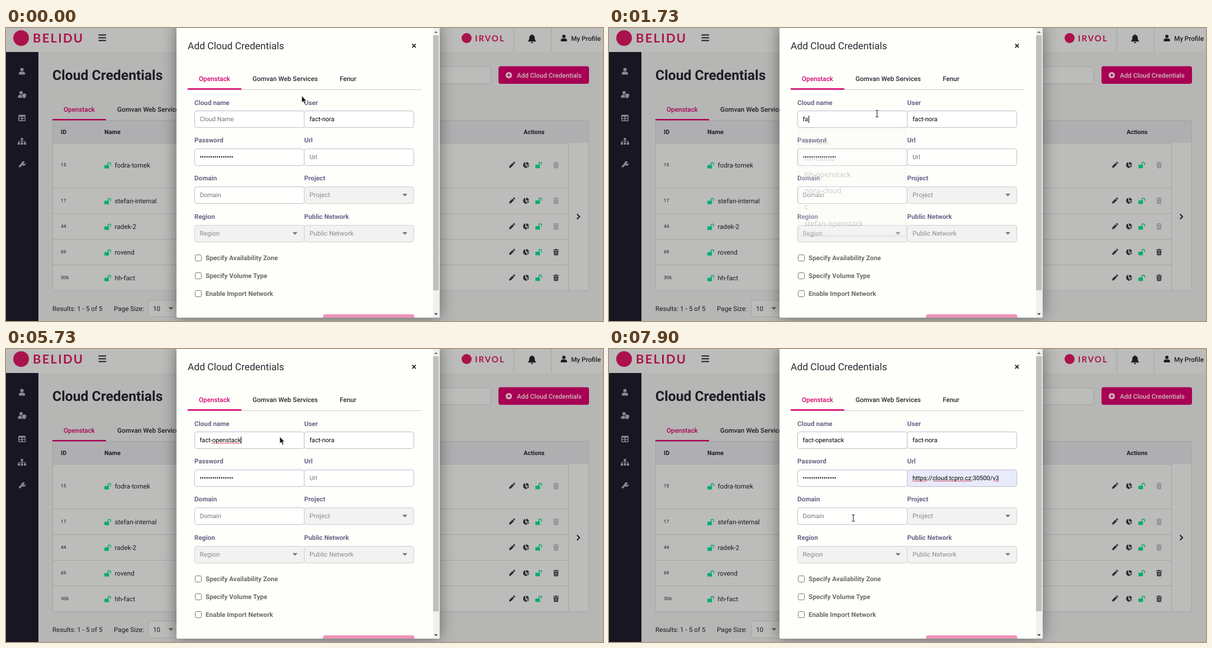
Recreate the animation shown at these times as an HTML page. Size 1068 by 525 pixels, loop 8000 ms.

```html
<!DOCTYPE html>
<html lang="en">
<head>
<meta charset="utf-8">
<title>Add Cloud Credentials</title>
<style>
html, body { margin: 0; width: 100%; height: 100%; overflow: hidden; background: #b6b6b5; }
svg { display: block; width: 1068px; height: 525px; }
text { font-family: Roboto, sans-serif; text-rendering: geometricPrecision; white-space: pre; }
.menu text { font-family: "Open Sans", sans-serif; }
.preview { font-family: "Liberation Sans", sans-serif; }
.brand { font-family: Lato, sans-serif; }
</style>
</head>
<body>
<svg id="stage" viewBox="0 0 1068 525"></svg>
<script>
const LOOP = 8000;
const CLOUD = 'fact-openstack';
const URL_TEXT = 'https://cloud.tcpro.cz:30500/v3';
const PINK = '#d6006c', INK = '#1d1c24', GREEN = '#05ac72';
// Colours of the page under the dark overlay
const DIM = { pink: '#a80054', logo: '#ab124c', panel: '#bcbcba', page: '#b6b6b5', head: '#afafb1', edge: '#a3a3a3', light: '#cfbac3' };

// y is the middle of the capital letters
const text = (x, y, s, size = 11.7, fill = INK, weight = 400, attr = '') =>
  `<text x="${x}" y="${y + size * 0.355}" font-size="${size}" font-weight="${weight}" fill="${fill}" ${attr}>${s}</text>`;
const rect = (x, y, w, h, fill, attr = '') =>
  `<rect x="${x}" y="${y}" width="${w}" height="${h}" fill="${fill}" ${attr}/>`;
const circle = (x, y, r, fill) => `<circle cx="${x}" cy="${y}" r="${r}" fill="${fill}"/>`;
const path = (d, fill, attr = '') => `<path d="${d}" fill="${fill}" ${attr}/>`;
const line = (d, stroke, width = 1) => path(d, 'none', `stroke="${stroke}" stroke-width="${width}"`);
const at = (x, y, s, attr = '') => `<g transform="translate(${x} ${y})" ${attr}>${s}</g>`;
const group = (id, s, attr = '') => `<g id="${id}" ${attr}>${s}</g>`;
const shadow = (id, dy, blur, opacity) =>
  `<filter id="${id}" x="-25%" y="-25%" width="150%" height="150%"><feDropShadow dx="0" dy="${dy}" stdDeviation="${blur}" flood-opacity="${opacity}"/></filter>`;
const arrowDown = (x, y, fill) => path(`M${x - 4.5} ${y - 2.3}h9l-4.5 4.8z`, fill);
const wave = (x1, x2, y) =>
  line(`M${x1} ${y}q1 -2 2 0` + 't2 0'.repeat(Math.floor((x2 - x1) / 2) - 1), '#e0284a', 1);

const icon = {
  lock: rect(-6, -0.5, 8.2, 6.3, GREEN, 'rx="1"') +
    line('M0.4 0v-2.3a2.4 2.4 0 0 1 4.8 0v2.2', GREEN, 1.5),
  user: circle(0, -3, 3, 'currentColor') +
    path('M-5.5 6v-2a3.5 3.5 0 0 1 3.5 -3.3h4a3.5 3.5 0 0 1 3.5 3.3v2z', 'currentColor'),
  pencil: path('M-5 5l.6 -3.2 5.6 -5.6 2.6 2.6 -5.6 5.6zM2 -4.6l1.2 -1.1q.6 -.5 1.2 0l1.2 1.2q.5 .6 0 1.2l-1.1 1.2z', '#2b2b33'),
  pie: path('M-1 -5.2v5.7l4 4a5.3 5.3 0 1 1 -4 -9.7zM.5 -5.6a5.2 5.2 0 0 1 5.1 5.1h-5.1zM1.4 .7h4.3a5.3 5.3 0 0 1 -1.6 3.2z', '#2b2b33'),
  trash: path('M-5 -4.8h3l.7 -1h2.6l.7 1h3v1.4h-10zM-4.3 -2.6h8.6l-.6 7.4q-.1 .9 -1 .9h-5.4q-.9 0 -1 -.9z', 'currentColor') +
    line('M-1.8 -1.2v5.4M0 -1.2v5.4M1.8 -1.2v5.4', DIM.panel, 0.7),
};

function header() {
  return rect(0, 0, 1068, 43, DIM.panel) +
    circle(27, 18, 14, DIM.logo) +
    text(48, 18.5, 'BELIDU', 22, DIM.logo, 700, 'class="brand" letter-spacing="2.2"') +
    line('M165.5 12.5h13.5m-13.5 5h13.5m-13.5 5h13.5', INK, 2) +
    circle(824, 18, 9, DIM.logo) +
    text(839, 18.5, 'IRVOL', 15, DIM.logo, 700, 'class="brand" letter-spacing="2"') +
    line('M908.5 0v42M975.5 0v42', DIM.edge) +
    at(941, 19, path('M-7 4.5q2.2 -2 2.2 -6a4.8 4.8 0 0 1 4 -4.9v-1.4h1.6v1.4a4.8 4.8 0 0 1 4 4.9q0 4 2.2 6v.8h-14zM-2 6.2h4a2 2 0 0 1 -4 0z', INK)) +
    at(998, 18, icon.user, `color="${INK}"`) +
    text(1011, 18.5, 'My Profile', 11.7, INK, 500);
}

function sidebar() {
  const c = '#8a8992', dark = '#191624';
  return rect(0, 43, 58, 482, dark) + `<g color="${c}">` +
    at(28.5, 77.5, icon.user) + at(27, 119, icon.user) + '</g>' +
    path('M32 118.5l4.5 -1.8 4.5 1.8q0 6 -4.5 8 -4.5 -2 -4.5 -8z', c, `transform="translate(-4 0)" stroke="${dark}"`) +
    rect(22, 155.5, 13, 11.5, c, 'rx="1.5"') +
    [0, 6].map(x => [0, 4].map(y => rect(23.5 + x, 158.8 + y, 4.2, 2.7, dark)).join('')).join('') +
    [[26.5, 197], [21, 205], [26.5, 205], [32, 205]].map(p => rect(...p, 4, 4, c, 'rx=".6"')).join('') +
    line('M28.5 200v5M23 205v-2h11v2', c, 1.2) +
    line('M23.5 249l6.5 -6.5', c, 3.2) +
    path('M33.8 239.8l-2.3 2.4 .3 1.5 1.5 .3 2 -2.2a4 4 0 1 1 -4 -3z', c);
}

function page() {
  const rows = [
    [245.5, 15, 'fodra-tomek'], [309.5, 17, 'stefan-internal'], [355.5, 44, 'radek-2'],
    [401.5, 69, 'rovend'], [447.5, 306, 'hh-fact'],
  ];
  return text(83, 84, 'Cloud Credentials', 24.7, INK, 700) +
    rect(600.5, 69.5, 267, 30, DIM.panel, `stroke="${DIM.edge}" rx="4"`) +
    rect(881, 68.5, 162, 31.5, DIM.pink, 'rx="4"') +
    circle(899.5, 84.5, 5.6, DIM.light) + line('M896.5 84.5h6m-3 -3v6', DIM.pink, 1.6) +
    text(914, 84.5, 'Add Cloud Credentials', 11.6, DIM.light, 500) +
    text(103, 145.5, 'Openstack', 11.7, DIM.pink, 500) +
    text(199, 145.5, 'Gomvan Web Services', 11.7, INK, 500) +
    rect(83.5, 165.5, 959, 305, DIM.panel, `stroke="${DIM.edge}" rx="2"`) +
    rect(84, 166, 958, 40, DIM.head) + rect(83, 163, 96, 2.5, DIM.pink) +
    line('M84 206.5h922M84 286.5h922M84 332.5h922M84 378.5h922M84 424.5h922M1006.5 206v264', DIM.edge) +
    text(98, 186.5, 'ID', 10.9, INK, 700) + text(176, 186.5, 'Name', 10.9, INK, 700) +
    text(926, 186.5, 'Actions', 10.9, INK, 700) +
    rows.map(([y, id, name], i) =>
      text(98, y - 0.5, id, 8.4) + at(182, y + 0.5, icon.lock) + text(194.5, y + 0.5, name) +
      at(905, y, icon.pencil) + at(930, y, icon.pie) + at(953, y, icon.lock) +
      at(984, y, icon.trash, `color="${i < 3 ? '#8c8c8f' : '#2b2b33'}"`)).join('') +
    line('M1021.5 333.5l4.5 4.5 -4.5 4.5', INK, 2) +
    text(83, 502.5, 'Results: 1 - 5 of 5') + text(193, 502.5, 'Page Size:') +
    rect(254.5, 487.5, 70, 30, DIM.panel, `stroke="${DIM.edge}" rx="4"`) +
    text(263, 502.5, '10') + arrowDown(295, 502.5, '#5c5c5c');
}

function field(x, y, label, hint, select, id) {
  return text(x, y - 30, label, 11.7, '#67678a', 700) +
    rect(Math.floor(x) + 0.5, Math.floor(y - 15) + 0.5, 196, 30, select ? '#f2f2f2' : '#fffffd',
      `stroke="${select ? '#cdcdcf' : '#bcbccb'}" rx="4" id="${id}Box"`) +
    text(x + 9.5, y, hint, select ? 11.7 : 11.1, select ? '#8b8b8b' : '#757575', 400, `id="${id}Hint"`) +
    (select ? arrowDown(x + 180, y, '#777') : '');
}

function modal() {
  const box = (y, s) => rect(338.5, y - 5.5, 11, 11, '#fff', 'stroke="#767676" rx="2"') +
    text(357, y + 0.3, s, 11.7, '#6b6b6b', 700);
  return rect(305, -5, 470.5, 524, '#fefefa', 'rx="3" filter="url(#glow)"') +
    rect(764, 0, 11.5, 519, '#f0f0ee') + rect(764, 13, 10, 457, '#bfbfbd') +
    path('M766 9l3.2 -3.5 3.2 3.5z', '#777') + path('M766 511l3.2 3.5 3.2 -3.5z', '#444') +
    text(325, 32, 'Add Cloud Credentials', 17.45, '#2a2a33') +
    line('M726.7 28.7l6.3 6.3m0 -6.3l-6.3 6.3', '#2a2a2a', 1.9) +
    text(345, 90.5, 'Openstack', 11.7, PINK, 500) +
    text(441, 90.5, 'Gomvan Web Services', 11.7, '#2a2a33', 500) +
    text(597, 90.5, 'Fenur', 11.7, '#2a2a33', 500) +
    line('M325 110.5h418', '#cbcbcf') + rect(325, 108, 96, 2.5, PINK) +
    field(337, 163.5, 'Cloud name', 'Cloud Name', 0, 'cloud') +
    field(533.5, 163.5, 'User', '', 0, 'user') + text(543, 163.5, 'fact-nora', 11.1, '#000') +
    field(337, 231.3, 'Password', '', 0, 'pass') + text(346.5, 231.3, '•'.repeat(16), 11.1, '#000') +
    field(533.5, 231.3, 'Url', 'Url', 0, 'url') +
    field(337, 299, 'Domain', 'Domain', 0, 'domain') +
    field(533.5, 299.3, 'Project', 'Project', 1, 'project') +
    field(337, 368, 'Region', 'Region', 1, 'region') +
    field(533.5, 368, 'Public Network', 'Public Network', 1, 'net') +
    box(412, 'Specify Availability Zone') + box(444, 'Specify Volume Type') + box(476, 'Enable Import Network') +
    path('M567 519v-2q0 -4 4 -4h155.5q4 0 4 4v2z', '#ee93b8') +
    text(346.5, 163.5, '', 11.1, '#000', 400, 'id="typed"') +
    text(543, 231.3, URL_TEXT, 11.13, '#000', 400, 'id="preview" class="preview"') +
    text(543, 231.3, URL_TEXT, 11, '#000', 400, 'id="filled"') +
    group('cloudWave', wave(368.5, 420, 169)) +
    group('urlWave', wave(543, 569, 236.8) + wave(580, 650, 236.8) + wave(687.5, 699, 236.8)) +
    rect(0, 0, 1, 13, '#000', 'id="caret"');
}

function menu(id, x, y, w, items, extra = '') {
  const h = items.length * 30.15 + 14;
  return group(id, rect(x, y, w, h, '#f8f8f6', 'stroke="#d4d4d2" filter="url(#shade)"') + extra +
    items.map((s, i) => text(x + 10.5, y + 22.5 + i * 30.15, s, 13.5, '#333', 500)).join(''), 'class="menu"');
}

const beamShape = 'M-2.5 -6q2 0 2.5 1 .5 -1 2.5 -1M0 -5v10M-2.5 6q2 0 2.5 -1 .5 1 2.5 1';
const stage = document.getElementById('stage');
stage.innerHTML = shadow('shade', 1.5, 1.5, 0.35) + shadow('glow', 0, 14, 0.45) +
  rect(0, 0, 1068, 525, DIM.page) + page() + header() + sidebar() + modal() +
  menu('names', 336.5, 179, 197, ['hh-fact', 'hh-cloud', 'hh-openstack', 'nora-cloud', 'c', 'stefan-openstack']) +
  menu('urls', 533.5, 247, 230, [URL_TEXT], rect(534, 254, 229, 30, '#dddcd9', 'id="hover"')) +
  group('arrow', path('M0 0v12.2l2.8 -2.5 2 4.6 2.2 -1 -2 -4.4h3.6z', '#111', 'stroke="#fff" stroke-width=".8"')) +
  group('beam', line(beamShape, '#fff', 2.4) + line(beamShape, '#222', 1.1));

const $ = id => document.getElementById(id);
const show = (id, on) => $(id).setAttribute('visibility', on ? 'visible' : 'hidden');
const within = (t, a, b) => t >= a && t < b;

const keyTimes = [1600, 1690, 2030, 2230, 2800, 3170, 3270, 3370, 3530, 3770, 3930, 4070, 4330, 4470];
const track = [ // time, x, y
  [0, 529, 121.5], [580, 529, 121.5], [830, 479.5, 153.5], [2029, 479.5, 153.5], [2030, 479.5, 154.5],
  [5590, 479.5, 154.5], [5730, 489.5, 157], [6100, 583.5, 231.5], [6480, 583.5, 231.5], [6730, 593, 258],
  [7320, 593, 258], [7820, 443, 304], [7900, 437, 303], [LOOP, 437, 303],
];

function pointer(t) {
  const i = track.findIndex(p => p[0] > t);
  const [t0, x0, y0] = track[i - 1], [t1, x1, y1] = track[i];
  const k = (t - t0) / (t1 - t0);
  return `translate(${x0 + (x1 - x0) * k} ${y0 + (y1 - y0) * k})`;
}

// Popups close by fading while shrinking about their centre
function popup(id, t, open, close, span, cx, cy) {
  const p = Math.min(1, Math.max(0, (t - close) / span)), s = 1 - 0.04 * p;
  show(id, t >= open && p < 1);
  $(id).setAttribute('opacity', 1 - p);
  $(id).setAttribute('transform', `translate(${cx} ${cy}) scale(${s}) translate(${-cx} ${-cy})`);
}

function placeCaret(t) {
  const end = id => $(id).getComputedTextLength();
  let spot = null;
  if (within(t, 430, 1030)) spot = [347, 293];
  else if (within(t, 1570, 5070) || within(t, 5630, 6050)) spot = [346.7 + end('typed'), 157];
  else if (within(t, 6050, 6640)) spot = [543, 225];
  else if (within(t, 7210, 7780)) spot = [543 + end('filled'), 225];
  show('caret', spot);
  if (spot) {
    $('caret').setAttribute('x', Math.round(spot[0]));
    $('caret').setAttribute('y', spot[1]);
  }
}

function draw(now) {
  const t = now % LOOP;
  const count = keyTimes.filter(k => k <= t).length;
  const hovered = t >= 6640, chosen = t >= 7210;
  $('typed').textContent = CLOUD.slice(0, count);
  show('cloudHint', !count);
  show('cloudWave', within(t, 5470, 6050));
  show('urlHint', !hovered);
  show('preview', hovered && !chosen);
  show('filled', chosen);
  show('urlWave', t >= 7500);
  $('hover').setAttribute('opacity', hovered ? 1 : 0);
  $('urlBox').setAttribute('fill', hovered ? '#e8ebfa' : '#fffffd');
  popup('names', t, 1570, 1605, 170, 435, 277);
  popup('urls', t, 6330, 7158, 170, 648, 269);
  placeCaret(t);
  const arrow = t < 790 || within(t, 5600, 6060) || within(t, 7400, 7800);
  show('arrow', arrow);
  show('beam', !arrow);
  $(arrow ? 'arrow' : 'beam').setAttribute('transform', pointer(t));
}

const start = performance.now();
function tick() {
  draw(performance.now() - start);
  requestAnimationFrame(tick);
}
tick();
</script>
</body>
</html>
```
